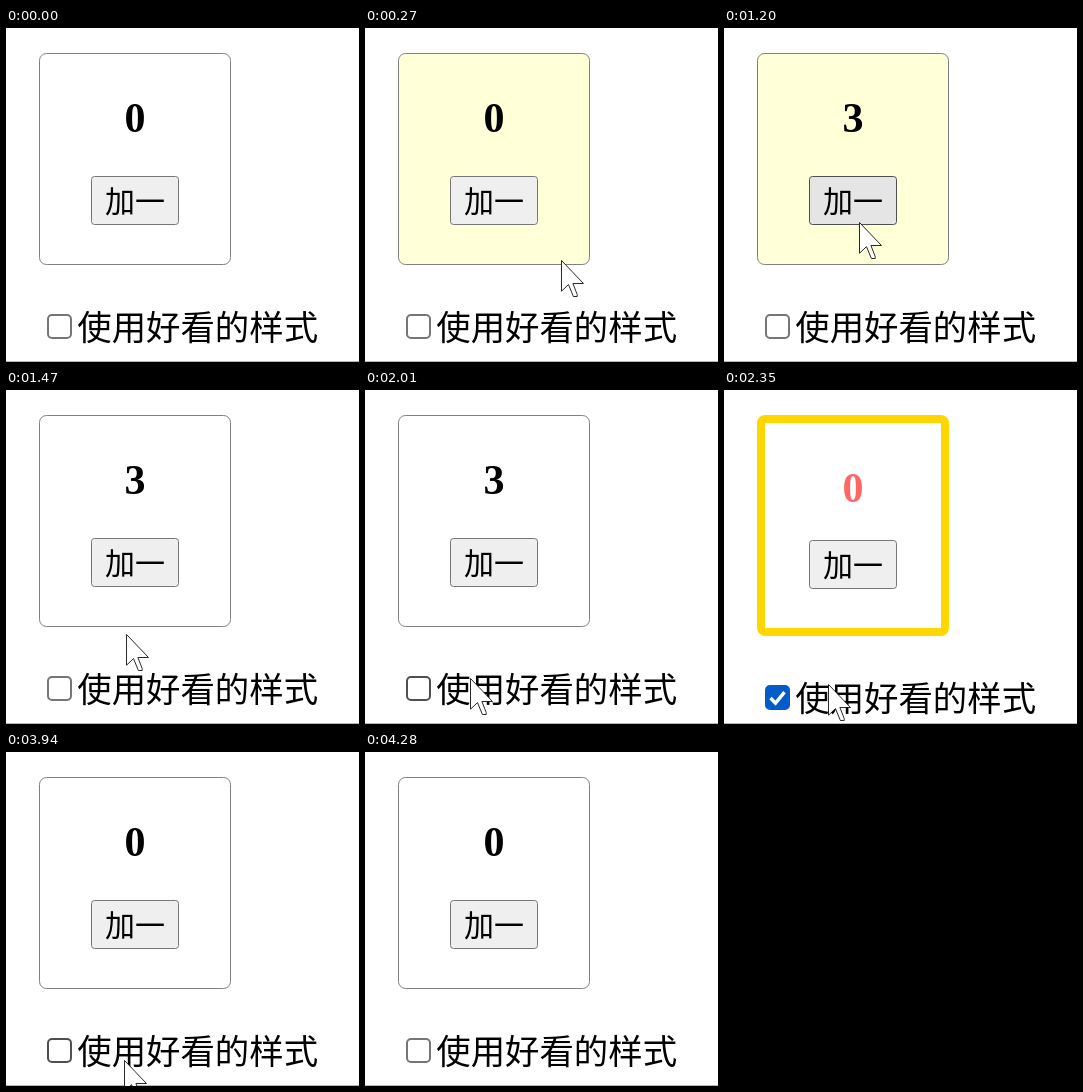
Animation of 353 by 334 pixels, one loop 4.94 s. Source, as an HTML page:

```html
<!DOCTYPE html>
<html lang="zh-CN">
<head>
<meta charset="utf-8">
<title>加一</title>
<style>
  html, body { margin: 0; width: 100%; height: 100%; overflow: hidden; background: #fff; }
  svg { display: block; }
  .sans { font-family: "Noto Sans CJK SC", "Noto Sans CJK", sans-serif; font-weight: 300; }
  #count { font: bold 42px "Liberation Serif", Times, serif; text-anchor: middle; }
</style>
</head>
<body>
<svg width="353" height="334" viewBox="0 0 353 334">
  <rect id="plain" x="33.5" y="25.5" width="191" height="211" rx="7" stroke="#808080"/>
  <rect id="fancy" x="37" y="29" width="184" height="213" rx="4" fill="#fff" stroke="#ffd700" stroke-width="8"/>
  <text id="count" x="129"></text>
  <g id="button">
    <rect id="face" x="85.5" y="148.5" width="87" height="48" rx="3"/>
    <text class="sans" x="99" y="183.8" font-size="30">加一</text>
  </g>
  <g id="label">
    <rect id="box" x="42" y="287" width="23" height="23" rx="4" stroke-width="2"/>
    <path id="tick" d="M46.5 299l5 5.2 9-11" fill="none" stroke="#fff" stroke-width="3.4"/>
    <text class="sans" x="71.3" y="312" font-size="34.4">使用好看的样式</text>
  </g>
  <rect y="333" width="353" height="1" fill="#b6b6b6"/>
  <g id="cursor">
    <path d="M.5 .5V31.2L7.5 24.6L12.4 36.5H16.2V34.5L11.9 23.5H22.5Z" fill="#fff" stroke="#111" stroke-width=".9"/>
    <circle id="ring" r="20" fill="#ff0" fill-opacity=".5"/>
  </g>
</svg>
<script>
const LOOP = 4940, TICKS = 74, LEAD = 7;
const $ = id => document.getElementById(id);
const show = (id, on) => $(id).setAttribute('visibility', on ? 'visible' : 'hidden');
const shift = (id, x, y) => $(id).setAttribute('transform', `translate(${x} ${y})`);
const paint = (id, fill, stroke) => {
  $(id).setAttribute('fill', fill);
  $(id).setAttribute('stroke', stroke);
};

const linear = p => p;
const easeOut = p => 1 - (1 - p) ** 1.7;
const easeIn = p => p ** 1.5;

// Pointer path: tick, x, y, easing towards that point
const path = [
  [1, 287, 314, linear], [8, 139, 180, easeOut], [17, 139, 180, linear],
  [18, 135, 194, linear], [22, 120, 244, linear], [25, 110, 264, linear],
  [33, 104, 294, easeOut], [41, 104, 294, linear], [44, 106, 306, easeOut],
  [58, 106, 306, linear], [63, 238, 327, easeIn]
];
const presses = [9, 11, 13, 34, 52, 53];
const counts = [10, 12, 14];
const [checkAt, uncheckAt] = [35, 54];

function pointer(k) {
  const i = path.findIndex(p => p[0] >= k);
  if (k < path[0][0] || i < 0) return null;
  const [t1, x1, y1, ease] = path[i];
  const [t0, x0, y0] = path[Math.max(0, i - 1)];
  const p = t1 > t0 ? ease((k - t0) / (t1 - t0)) : 1;
  return [x0 + (x1 - x0) * p, y0 + (y1 - y0) * p];
}

const within = (pt, x0, y0, x1, y1) =>
  !!pt && pt[0] >= x0 && pt[0] < x1 && pt[1] >= y0 && pt[1] < y1;

function render(time) {
  const k = Math.floor(((time + LEAD) % LOOP) / LOOP * TICKS);
  const pt = pointer(k);
  const down = presses.includes(k);
  const on = k >= checkAt && k < uncheckAt;
  const drop = on ? 9 : 0;

  show('plain', !on);
  show('fancy', on);
  $('plain').setAttribute('fill', within(pt, 33, 25, 225, 237) ? '#ffffd8' : '#fff');

  $('count').textContent = k < checkAt ? counts.filter(c => k >= c).length : 0;
  $('count').setAttribute('y', on ? 112 : 104);
  $('count').setAttribute('fill', on ? '#ff6666' : '#000');

  const overButton = within(pt, 85, 148, 173, 197);
  shift('button', 0, on ? 2 : 0);
  if (overButton && down) paint('face', '#f5f5f5', '#8d8d8d');
  else if (overButton) paint('face', '#e5e5e5', '#4f4f4f');
  else paint('face', '#efefef', '#767676');

  const overLabel = within(pt, 41, 281 + drop, 312, 319 + drop);
  shift('label', 0, drop);
  show('tick', on);
  if (on) paint('box', '#005cc8', '#005cc8');
  else paint('box', '#fff', overLabel ? '#4f4f4f' : '#767676');

  $('cursor').style.display = pt ? '' : 'none';
  $('ring').style.display = down ? '' : 'none';
  if (pt) shift('cursor', Math.round(pt[0]), Math.round(pt[1]));
}

const start = performance.now();
function loop() {
  render(performance.now() - start);
  requestAnimationFrame(loop);
}
loop();
</script>
</body>
</html>
```
